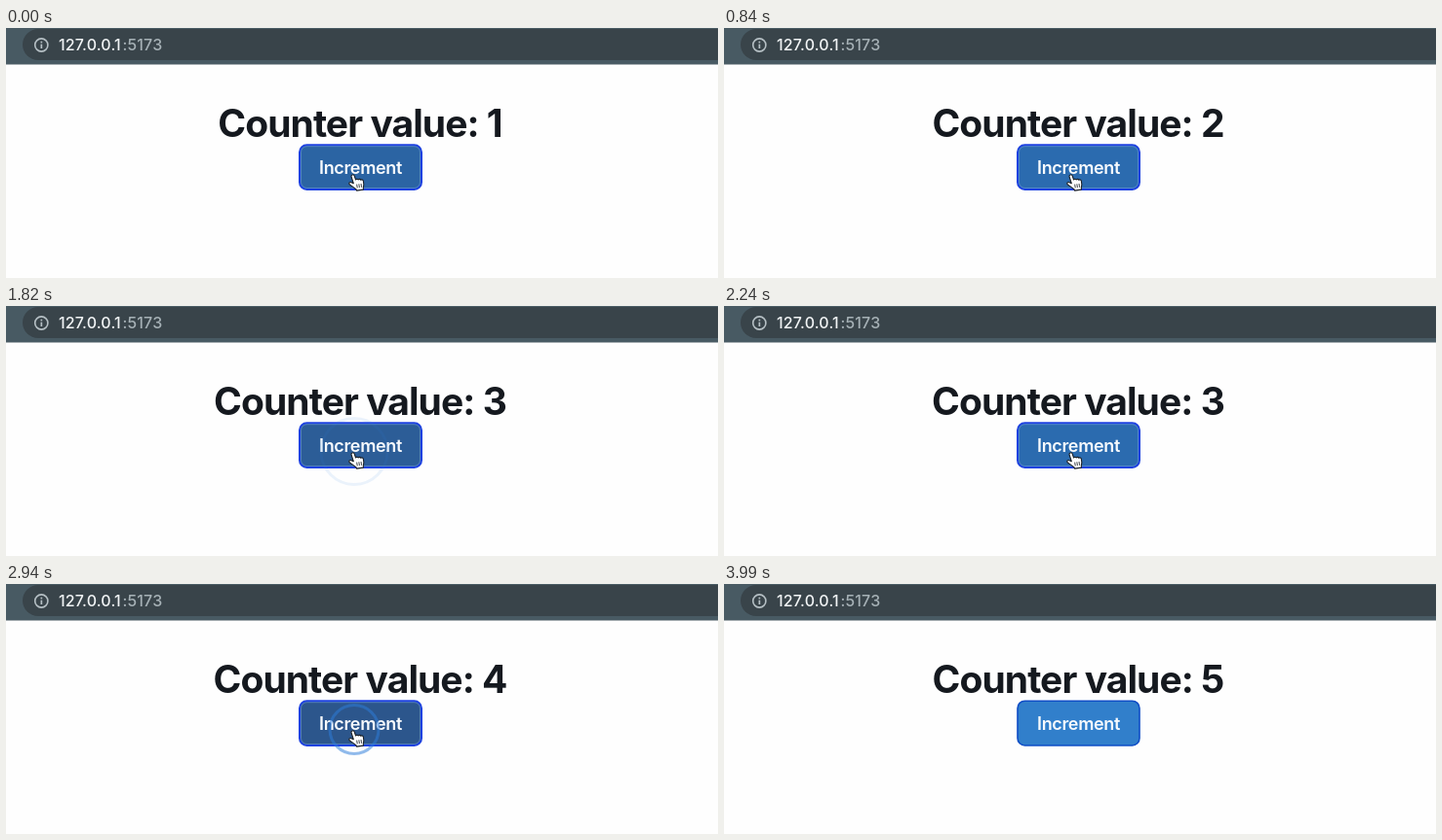
Write an HTML page with a canvas that moves like this. It is 730 px wide and 257 px high and loops after 4060 ms.

```html
<!DOCTYPE html>
<html lang="en">
<head>
<meta charset="utf-8">
<title>Counter</title>
<style>
  html, body { margin: 0; width: 100%; height: 100%; overflow: hidden; background: #fefefe; }
  canvas { display: block; width: 730px; height: 257px; }
</style>
</head>
<body>
<canvas id="stage" width="730" height="257"></canvas>
<script>
const ctx = document.getElementById('stage').getContext('2d');
const LOOP = 4060, STEP = 70, HOLD = 170, FADE = 110, EASE = 200;
const PRESSES = [-300, 480, 1560, 2330, 2790];
const LEAVE = { start: 3080, length: 350, exit: 3240 };
const IDLE = [49, 127, 203], HOVER = [43, 107, 175], ACTIVE = [44, 82, 134];
const RING_IDLE = [14, 77, 198], RING_FOCUS = [30, 66, 224];

const HAND = new Path2D('M5.2 2.6C5 .6 8 .2 8.4 2.2L9.2 6.4C10 5.6 11.4 5.8 11.8 6.8' +
  'C12.6 6.1 14 6.4 14.3 7.4C15.4 7 16.6 7.6 16.7 8.8C16.9 11 16.9 13 15.8 15' +
  'L15.4 17.6H8.6L8 16C6.5 14.4 4 12 2.2 10.2C1.2 9 2.6 7.6 4.2 8.4L6.4 9.8Z');
const KNUCKLES = new Path2D('M9.6 11.2V15M11.8 11.2V15M14 11.2V15');
const ARROW = new Path2D('M0 0V15.5L3.6 12.2L6 17.6L8.6 16.5L6.2 11.2H11Z');

const clamp = x => Math.max(0, Math.min(1, x));
const smooth = x => { x = clamp(x); return x * x * (3 - 2 * x); };
const mix = (a, b, k) => a.map((v, i) => v + (b[i] - v) * k);
const rgb = c => `rgb(${c.map(Math.round).join(',')})`;

function text(str, x, y, size, weight, color, tracking, align = 'left') {
  ctx.font = `${weight} ${size}px Inter, sans-serif`;
  ctx.letterSpacing = `${tracking * size}px`;
  ctx.textAlign = align;
  ctx.fillStyle = color;
  ctx.fillText(str, x, y);
}

function box(x, y, w, h, r) {
  ctx.beginPath();
  ctx.roundRect(x, y, w, h, r);
}

function circle(x, y, r) {
  ctx.beginPath();
  ctx.arc(x, y, r, 0, Math.PI * 2);
}

function addressBar() {
  ctx.fillStyle = '#485a63';
  ctx.fillRect(0, 0, 730, 37.5);
  ctx.fillStyle = '#39444a';
  box(17, 1, 760, 32, 16);
  ctx.fill();
  ctx.strokeStyle = ctx.fillStyle = '#b5bfc4';
  ctx.lineWidth = 1.6;
  circle(36.3, 17.5, 6.6);
  ctx.stroke();
  ctx.fillRect(35.5, 16.6, 1.7, 4.4);
  ctx.fillRect(35.5, 13.7, 1.7, 1.7);
  text('127.0.0.1', 54, 23, 16, 500, '#f1f4f5', 0.01);
  text(':5173', 119.5, 23, 16, 500, '#a6b1b6', 0.01);
}

function pressDepth(t) {
  return Math.max(...PRESSES.map(p => {
    const age = t - p;
    return age < HOLD ? smooth(age / EASE) : 1 - smooth((age - HOLD) / EASE);
  }));
}

function button(t) {
  const gone = smooth((t - LEAVE.exit) / EASE);
  const fill = mix(mix(HOVER, ACTIVE, pressDepth(t)), IDLE, gone);
  ctx.fillStyle = rgb(fill);
  ctx.strokeStyle = rgb(mix(RING_FOCUS, RING_IDLE, gone));
  ctx.lineWidth = 2 - 0.4 * gone;
  box(301, 120.2, 125, 45.8, 7.5);
  ctx.fill();
  ctx.stroke();
  ctx.strokeStyle = `rgba(125,170,225,${0.45 * (1 - gone)})`;
  ctx.lineWidth = 1;
  box(302.5, 121.7, 122, 42.8, 6);
  ctx.stroke();
  text('Increment', 363.5, 150, 18, 600, '#f7fafd', -0.02, 'center');
}

// The ring grows on press, then spreads and fades on release.
function ripple(age) {
  if (age <= 0 || age >= HOLD + FADE) return;
  const grow = clamp(age / 100), out = clamp((age - HOLD) / FADE);
  circle(357, 149.5, 15 + 10 * grow + 11 * out);
  ctx.strokeStyle = `rgba(45,125,218,${0.52 * grow * (1 - out)})`;
  ctx.lineWidth = 3;
  ctx.stroke();
}

function cursor(t) {
  const k = Math.max(0, (t - LEAVE.start) / LEAVE.length) ** 2.2;
  const x = 357 - 35 * k, y = 151 + 102 * k;
  if (y > 260) return;
  ctx.save();
  ctx.lineJoin = 'round';
  if (t < LEAVE.exit) {
    ctx.translate(x - 8.5, y);
    ctx.rotate(-0.15);
    ctx.fillStyle = '#fff';
    ctx.strokeStyle = '#1b2026';
    ctx.lineWidth = 1.1;
    ctx.fill(HAND);
    ctx.stroke(HAND);
    ctx.lineWidth = 0.8;
    ctx.stroke(KNUCKLES);
  } else {
    ctx.translate(x, y);
    ctx.strokeStyle = '#fff';
    ctx.lineWidth = 2;
    ctx.stroke(ARROW);
    ctx.fillStyle = '#15181c';
    ctx.fill(ARROW);
  }
  ctx.restore();
}

function draw(t) {
  ctx.fillStyle = '#fefefe';
  ctx.fillRect(0, 0, 730, 257);
  addressBar();
  const count = PRESSES.filter(p => t >= p + HOLD).length;
  text(`Counter value: ${count}`, 363, 112, 39, 700, '#15191f', -0.024, 'center');
  button(t);
  PRESSES.forEach(p => ripple(t - p));
  cursor(t);
}

const start = performance.now();
function tick() {
  const t = (performance.now() - start) % LOOP;
  draw(Math.floor(t / STEP) * STEP);
  requestAnimationFrame(tick);
}
tick();
</script>
</body>
</html>
```
